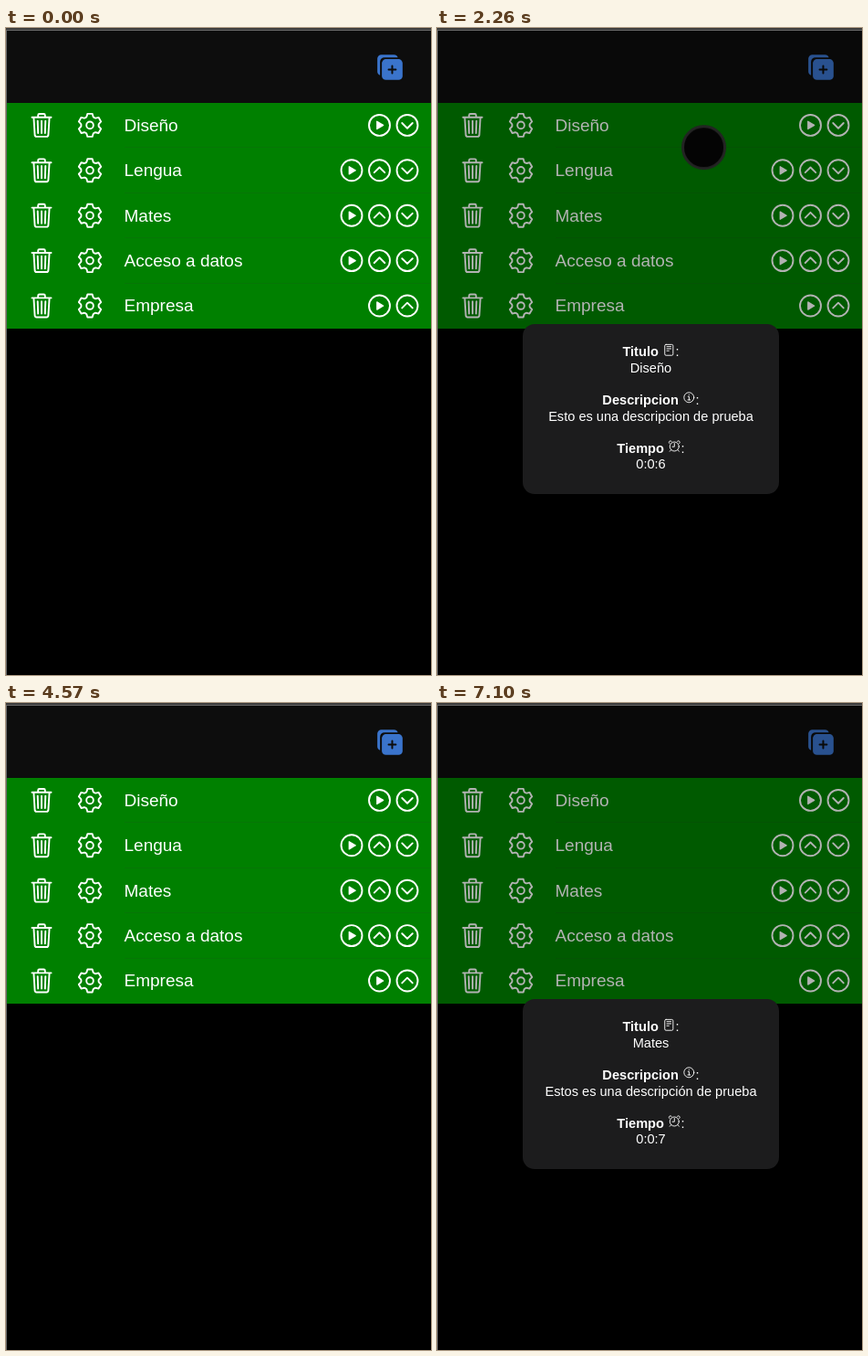
These frames come from a looping animation (466 px wide and 708 px high, 7150 ms). An HTML page:

```html
<!DOCTYPE html>
<html lang="es">
<head>
<meta charset="utf-8">
<title>Tareas</title>
<style>
html, body { margin: 0; width: 100%; height: 100%; overflow: hidden; background: #000; }
body { position: relative; font-family: "Liberation Sans", Arial, sans-serif; }
#list, #shade { position: absolute; left: 0; top: 0; width: 466px; height: 708px; }
#list { color: #fff; font-size: 19px; }
#shade { background: #000; animation: shade 7150ms ease-in-out infinite; }
#frame { position: absolute; left: 0; top: 2px; width: 470px; height: 710px; box-sizing: border-box;
  border: solid #686868; border-width: 1px 0 0 1px; }
#edge { position: absolute; left: 0; top: 0; width: 466px; height: 2px; background: #3c3c3c; }

.alert { position: absolute; left: 93.5px; top: 324px; width: 281px; height: 186px; box-sizing: border-box;
  padding-top: 22.3px; border-radius: 13px; background: #1c1c1d; color: #fff;
  font-size: 14.6px; line-height: 17.6px; text-align: center; white-space: nowrap; }
.alert p { margin: 0 0 17.6px; }
.alert svg { width: 1em; height: 1em; margin-top: -3px; overflow: visible; }
#first { animation: first 7150ms ease-in-out infinite; }
#second { animation: second 7150ms ease-in-out infinite; }

#touch { position: absolute; left: -24.5px; top: -24.5px; width: 49px; height: 49px; box-sizing: border-box;
  border: 3px solid #242424; border-radius: 50%; background: #040404;
  animation: move 7150ms ease-in-out infinite, seen 7150ms step-end infinite; }

@keyframes shade {
  0%, 27.13% { opacity: 0; }
  29.93%, 59.44% { opacity: .3; }
  62.24%, 74.27% { opacity: 0; }
  77.06%, 100% { opacity: .3; }
}
@keyframes first {
  0%, 27.13% { opacity: 0; transform: scale(1.1); }
  29.93%, 59.44% { opacity: 1; transform: scale(1); }
  62.24%, 100% { opacity: 0; transform: scale(.9); }
}
@keyframes second {
  0%, 74.27% { opacity: 0; transform: scale(1.1); }
  77.06%, 100% { opacity: 1; transform: scale(1); }
}
@keyframes move {
  0%, 18.2% { transform: translate(300px, 41px); }
  25.9%, 31.5% { transform: translate(292px, 130px); }
  39.9% { transform: translate(420px, 480px); }
  68.5% { transform: translate(300px, 41px); }
  73.4%, 78.3% { transform: translate(253px, 228px); }
  86.7% { transform: translate(420px, 600px); }
  89% { transform: translate(420px, 410px); }
  96.5%, 100% { transform: translate(252px, 384px); }
}
@keyframes seen {
  0% { visibility: hidden; }
  18.2% { visibility: visible; }
  40.5% { visibility: hidden; }
  68.5% { visibility: visible; }
  99.2%, 100% { visibility: hidden; }
}
</style>
</head>
<body>
<svg id="list" viewBox="0 0 466 708"></svg>
<div id="shade"></div>
<div id="edge"></div>
<div id="frame"></div>
<div class="alert" id="first"></div>
<div class="alert" id="second"></div>
<div id="touch"></div>

<script>
// Six-toothed gear outline, in a 512 box
function gear() {
  const pts = [];
  for (let k = 0; k < 6; k++) {
    for (const [r, a] of [[161, -25], [168, -21], [214, -12], [214, 12], [168, 21], [161, 25]]) {
      const t = (k * 60 + a - 90) * Math.PI / 180;
      pts.push((256 + r * Math.cos(t)).toFixed(1) + ' ' + (256 + r * Math.sin(t)).toFixed(1));
    }
  }
  return 'M' + pts.join('L') + 'Z';
}

const ring = '<circle cx="256" cy="256" r="192"/>';
const icons = {
  trash: '<path d="M112 112l20 320c1 18 14 32 32 32h184c18 0 31-14 32-32l20-320M80 112h352' +
    'M192 112V72a24 24 0 0124-24h80a24 24 0 0124 24v40M256 176v224M184 176l8 224M328 176l-8 224"/>',
  gear: `<path d="${gear()}"/><circle cx="256" cy="256" r="64"/>`,
  play: ring + '<path fill="currentColor" stroke="none" d="M216 334l115-69a11 11 0 000-18l-115-69a11 11 0 00-16 9v138a11 11 0 0016 9z"/>',
  up: ring + '<path d="M352 296l-96-96-96 96"/>',
  down: ring + '<path d="M352 216l-96 96-96-96"/>',
  copy: '<g fill="currentColor" stroke="none"><path d="M396 80A72 72 0 00328 32H104a72 72 0 00-72 72v224a72 72 0 0048 68V160a80 80 0 0180-80z"/>' +
    '<rect x="112" y="112" width="368" height="368" rx="72"/></g><path stroke="#0d0d0d" d="M296 232v128M232 296h128"/>',
  page: '<rect x="96" y="48" width="320" height="416" rx="48"/><path d="M176 128h160M176 208h160M176 288h80"/>',
  info: ring + '<path d="M220 220h40v130M208 350h100M256 150v8"/>',
  alarm: '<circle cx="256" cy="280" r="176"/><path d="M256 160v128h-80M64 160a56 56 0 0180-80M448 160a56 56 0 00-80-80M128 408l-48 56M384 408l48 56"/>'
};

function icon(name, attrs = '') {
  return `<svg viewBox="0 0 512 512" ${attrs} fill="none" stroke="currentColor" stroke-width="32" ` +
    `stroke-linecap="round" stroke-linejoin="round">${icons[name]}</svg>`;
}

function iconAt(name, x, y, size = 30.6) {
  return icon(name, `x="${x - size / 2}" y="${y - size / 2}" width="${size}" height="${size}"`);
}

const tasks = ['Diseño', 'Lengua', 'Mates', 'Acceso a datos', 'Empresa'];
const rowH = 49.4, top0 = 82;

function row(name, i) {
  const y = top0 + rowH * (i + .5) - .3;
  const last = i === tasks.length - 1;
  const tools = ['play'];
  if (i > 0) tools.push('up');
  if (!last) tools.push('down');
  const right = tools.map((t, k) => iconAt(t, 440 - 30.5 * (tools.length - 1 - k), y)).join('');
  const line = last ? '' : `<rect x="130" y="${Math.round(top0 + rowH * (i + 1)) - 1}" width="336" height="1" fill="#067606"/>`;
  return line + iconAt('trash', 39, y) + iconAt('gear', 92, y) +
    `<text x="129.5" y="${Math.round(y + 6.4)}" fill="currentColor">${name}</text>` + right;
}

document.getElementById('list').innerHTML =
  '<rect width="466" height="82" fill="#0d0d0d"/>' +
  `<rect y="${top0}" width="466" height="${rowH * 5}" fill="#008000"/>` +
  `<g color="#3a74cc">${iconAt('copy', 421, 43, 31.6)}</g>` +
  tasks.map(row).join('');

function fill(id, ...values) {
  const heads = [['Titulo', 'page'], ['Descripcion', 'info'], ['Tiempo', 'alarm']];
  document.getElementById(id).innerHTML = heads.map(([label, pic], i) =>
    `<p><b>${label}</b> ${icon(pic)}:<br>${values[i]}</p>`).join('');
}
fill('first', 'Diseño', 'Esto es una descripcion de prueba', '0:0:6');
fill('second', 'Mates', 'Estos es una descripción de prueba', '0:0:7');
</script>
</body>
</html>
```
